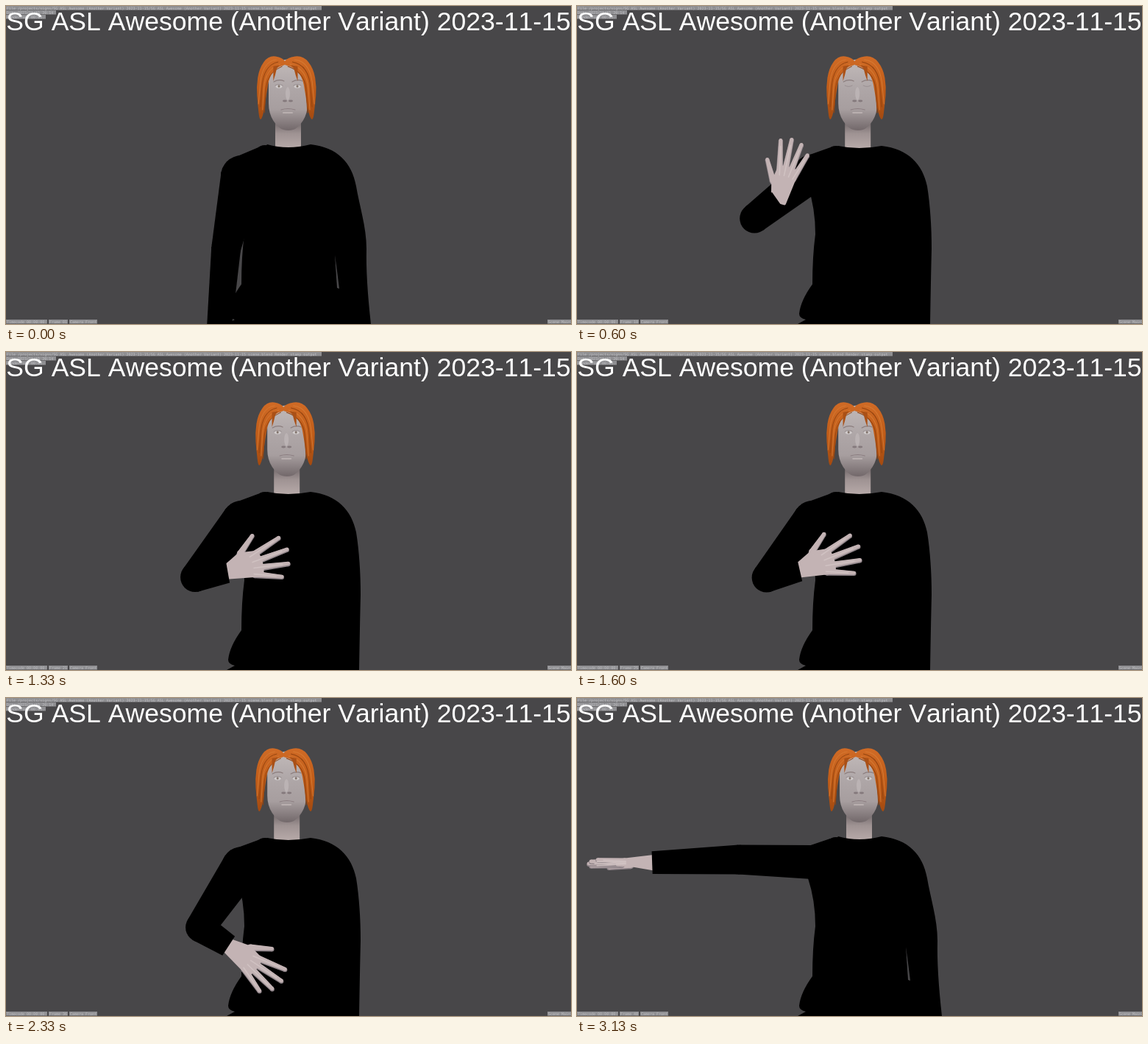
Animation of 768x432 px, one loop 3.19 s. Source, as an HTML page with a canvas:

```html
<!DOCTYPE html>
<html lang="en">
<head>
<meta charset="utf-8">
<title>SG ASL Awesome</title>
<style>
  html, body { margin: 0; width: 100%; height: 100%; overflow: hidden; background: #484749; }
  canvas, svg { position: absolute; left: 0; top: 0; width: 768px; height: 432px; }
  .title { font: 35.6px "Liberation Sans", Arial, sans-serif; font-kerning: none; fill: #fff; text-anchor: middle; }
  .stamp rect { fill: #8f8f92; }
  .stamp text { font: 5px "DejaVu Sans Mono", monospace; fill: #c0c0c4; }
</style>
</head>
<body>
<canvas id="stage" width="768" height="432"></canvas>
<svg viewBox="0 0 768 432">
  <g class="stamp" id="stamps"></g>
  <text class="title" x="384" y="33">SG ASL Awesome (Another Variant) 2023-11-15</text>
</svg>
<script>
const LOOP = 3190, FRAMES = 48, BG = '#484749';
const ctx = document.getElementById('stage').getContext('2d');

// Angles in degrees, clockwise from the right; reach is the visible forearm.
const poses = [
  { at: 0, upper: 102, fore: 95, reach: 150, palm: 90, spread: 9 },
  { at: 9, upper: 142, fore: -35, reach: 40, palm: -73, spread: 10 },
  { at: 20, upper: 129, fore: -10, reach: 45, palm: -14, spread: 13 },
  { at: 29, upper: 128, fore: -17, reach: 48, palm: -18, spread: 12 },
  { at: 35, upper: 124, fore: 33, reach: 46, palm: 39, spread: 11 },
  { at: 41, upper: 102, fore: 98, reach: 150, palm: 90, spread: 9 },
  { at: 47, upper: 182, fore: 178, reach: 118, palm: 180, spread: 2 }
];

const lerp = (a, b, k) => a + (b - a) * k;
const mix = (a, b, k) => a.map((v, i) => lerp(v, b[i], k));
const smooth = u => { u = Math.min(1, Math.max(0, u)); return u * u * (3 - 2 * u); };
const polar = ([x, y], deg, len) => {
  const a = deg * Math.PI / 180;
  return [x + len * Math.cos(a), y + len * Math.sin(a)];
};

function poseAt(frame) {
  const i = Math.max(0, poses.findLastIndex(p => p.at <= frame && p.at < 47));
  const a = poses[i], b = poses[i + 1], k = smooth((frame - a.at) / (b.at - a.at));
  return Object.fromEntries(Object.keys(a).map(key => [key, lerp(a[key], b[key], k)]));
}

function blob(points, fill) {
  const n = points.length;
  ctx.beginPath();
  ctx.moveTo(...mix(points[n - 1], points[0], .5));
  points.forEach((p, i) => ctx.quadraticCurveTo(...p, ...mix(p, points[(i + 1) % n], .5)));
  ctx.fillStyle = fill;
  ctx.fill();
}

function shape(path, fill) {
  ctx.fillStyle = fill;
  ctx.fill(new Path2D(path));
}

function stroke(path, width, color) {
  ctx.lineWidth = width;
  ctx.strokeStyle = color;
  ctx.stroke(new Path2D(path));
}

function oval(x, y, rx, ry, fill) {
  ctx.beginPath();
  ctx.ellipse(x, y, rx, ry, 0, 0, 7);
  ctx.fillStyle = fill;
  ctx.fill();
}

function fade(y0, y1, ...colors) {
  const g = ctx.createLinearGradient(0, y0, 0, y1);
  colors.forEach((c, i) => g.addColorStop(i / (colors.length - 1), c));
  return g;
}

// Tapered limb with a round start and a flat end.
function limb(a, ra, b, rb, fill = '#000') {
  const deg = Math.atan2(b[1] - a[1], b[0] - a[0]) * 180 / Math.PI;
  const corners = [polar(a, deg + 90, ra), polar(b, deg + 90, rb), polar(b, deg - 90, rb), polar(a, deg - 90, ra)];
  shape('M' + corners.join('L') + 'Z', fill);
  oval(...a, ra, ra, fill);
}

function torso(lean) {
  const top = 188 + 2 * lean, elbow = 490 - 8 * lean, hip = 496 - 16 * lean;
  shape(`M300 432L311 426Q302 424 302 418Q304 400 320 378Q320 340 324 310Q324 275 314 245
    L345 200L355 ${top}Q383 196 414 ${top}C450 ${top + 4} 470 ${212 + 3 * lean} 476 245
    C480 270 ${elbow} 300 ${elbow} 330Q${elbow - 1} 370 ${hip} 432Z`, '#000');
  const gap = Math.max(0, 1 - 2 * lean);
  shape(`M447 338l${3 * gap} 22l${3 * gap} 24l${-3 * gap} -1Z`, BG);
}

function hand(wrist, { palm, spread }) {
  const skin = '#c3b3b4', shade = '#8f8489', light = '#d0c2c2';
  const ray = i => palm + (i - 1.5) * spread;
  const fingers = [0, 1, 2, 3].map(i => [ray(i), 86 - 3 * (i - 1) ** 2]);
  const thumb = [ray(0) - 1.7 * spread, 59];
  const digit = ([deg, len], tone, grow, drop) => {
    const at = r => { const p = polar(wrist, deg, r); return [p[0], p[1] + drop]; };
    limb(at(len * .5), 4 + grow, at(len), 2.4 + grow, tone);
    oval(...at(len), 2.4 + grow, 2.4 + grow, tone);
  };
  [thumb, ...fingers].forEach(f => {
    digit(f, shade, .6, .8);
    digit(f, skin, 0, -.2);
  });
  const edge = [polar(wrist, palm - 90, 8), polar(wrist, thumb[0], 28),
    ...fingers.map(([deg]) => polar(wrist, deg, 47)), polar(wrist, palm + 90, 8)];
  const outline = 'M' + edge.join('L') + 'Z';
  shape(outline, skin);
  stroke(outline, 5, skin);
  fingers.forEach(([deg, len]) =>
    stroke(`M${polar(wrist, deg, 36)}L${polar(wrist, deg, len - 8)}`, 1.6, light));
}

function eye(x, closed) {
  stroke(`M${x - 7} 103Q${x} 99 ${x + 7} 102`, 1.2, '#8b7d7d');
  if (closed) return stroke(`M${x - 5} 108q5 3 10 0`, 1, '#9a9092');
  oval(x, 109, 4.5, 2.6, '#d0cbcb');
  oval(x, 109, 1.5, 1.8, '#80726a');
  stroke(`M${x - 5} 108q5 -3 10 0`, .8, '#8a7f82');
}

// One half of the hair, drawn outward from the parting.
function wing(scale) {
  ctx.save();
  ctx.translate(379, 0);
  ctx.scale(scale, 1);
  blob([[-3, 80], [3, 70], [24, 67], [38, 85], [42, 110], [40, 134], [37, 158], [31, 146],
    [27, 118], [23, 96], [10, 82]], fade(70, 155, '#cf6a25', '#c05c18', '#a34a10'));
  for (let i = 0; i < 4; i++) {
    const x = 28 + 3 * i;
    stroke(`M${4 + 3 * i} ${82 - 3 * i}Q${x - 2} ${90 - 5 * i} ${x} 112L${x + 2} ${145 - 4 * i}`, 1,
      i % 2 ? '#d67a33' : '#93430f');
  }
  shape('M8 80L17 82L17 102Q14 94 12 85Z', '#aa5016');
  ctx.restore();
}

function head(dx, closed) {
  ctx.save();
  ctx.translate(dx, 0);
  shape('M366 140L401 140L401 193L366 193Z', fade(155, 192, '#6b6264', '#9f9393', '#b5a8a7'));
  blob([[357, 80], [383, 70], [410, 80], [410, 118], [410, 146], [397, 166], [384, 170], [370, 166],
    [357, 146], [357, 118]], fade(85, 168, '#bbb3b3', '#aea6a7', '#a79e9f', '#746a6c'));
  eye(371, closed);
  eye(396, closed);
  oval(383, 119, 3, 9, '#bbb3b4');
  oval(379, 129, 3, 1.4, '#84797c');
  oval(387, 129, 3, 1.4, '#84797c');
  stroke('M374 141Q383 138 393 141', 1.2, '#8b7d80');
  stroke('M377 145h12', 2, '#b9afaf');
  wing(-.92);
  wing(1.03);
  ctx.restore();
}

function draw(frame) {
  const p = poseAt(frame);
  const lean = smooth(frame / 9) * (1 - smooth((frame - 35) / 12));
  const lift = (p.upper - 102) / 80;
  const shoulder = [320, 231 - 8 * lift], round = 28 - 5 * lift;
  const elbow = polar(shoulder, p.upper, 100);
  const wrist = polar(elbow, p.fore, p.reach);

  ctx.lineCap = ctx.lineJoin = 'round';
  ctx.fillStyle = BG;
  ctx.fillRect(0, 0, 768, 432);
  head(-1.8 * lean, Math.abs(frame - 9) < 2);
  torso(lean);
  limb([352, 205 + lean], 16, shoulder, round);
  limb(shoulder, round, elbow, 20);
  hand(wrist, p);
  limb(elbow, 20, wrist, 15.5);
}

const stamps = [
  [0, 0, 429, 'File /projects/signs/SG ASL Awesome (Another Variant) 2023-11-15/SG ASL Awesome (Another Variant) 2023-11-15 scene.blend  Render stamp output'],
  [0, 6, 68, 'Date 2023/11/15 20:14'],
  [0, 12, 54, 'RenderTime 00:01.'],
  [0, 426, 56, 'Timecode 00:00:00:'],
  [58, 426, 26, 'Frame 01'],
  [86, 426, 38, 'Camera Front'],
  [736, 426, 32, 'Scene Main']
];
document.getElementById('stamps').innerHTML = stamps.map(([x, y, w, text]) =>
  `<rect x="${x}" y="${y}" width="${w}" height="5.5"/><text x="${x + 1}" y="${y + 4.5}">${text}</text>`).join('');
const counter = document.querySelectorAll('.stamp text')[4];

const startOf = n => Math.round(n * 20 / 3) * 10;
let shown = -1;
function tick() {
  const t = performance.now() % LOOP;
  let n = FRAMES - 1;
  while (startOf(n) > t) n--;
  if (n !== shown) {
    shown = n;
    draw(n);
    counter.textContent = 'Frame ' + String(n + 1).padStart(2, '0');
  }
  requestAnimationFrame(tick);
}
tick();
</script>
</body>
</html>
```
